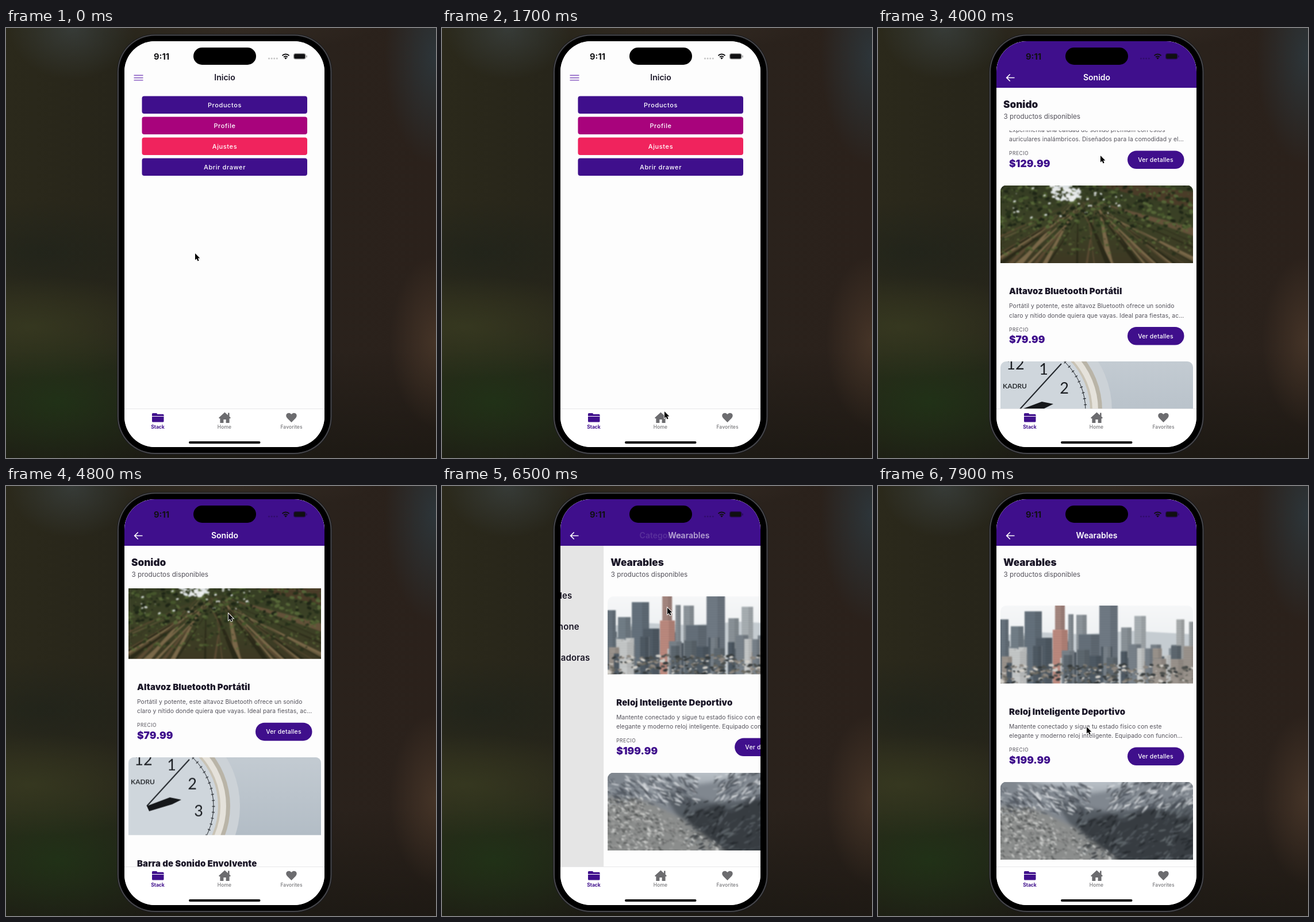
Recreate the animation shown at these times as an HTML page with a canvas. Size 748x748 px, loop 8000 ms.

```html
<!DOCTYPE html>
<html lang="es">
<head>
<meta charset="utf-8">
<title>Tienda</title>
<style>
html, body { margin: 0; width: 100%; height: 100%; overflow: hidden; }
body {
  background:
    radial-gradient(110px 90px at 115px 0, #434d5188, transparent),
    radial-gradient(90px 190px at 748px 50px, #2d3a41cc, transparent),
    radial-gradient(80px 150px at 748px 545px, #56402f99, transparent),
    radial-gradient(240px 40px at 400px 0, #3a2f2799, transparent),
    radial-gradient(260px 90px at 40px 520px, #3b3f22aa, transparent),
    radial-gradient(230px 130px at 90px 650px, #203517cc, transparent),
    radial-gradient(240px 90px at 60px 390px, #1d221a99, transparent),
    linear-gradient(transparent 75%, #15140f99),
    linear-gradient(90deg, #2b291b, #27251a 25%, #2a221c 75%, #2b211b);
}
canvas { display: block; width: 100vw; height: 100vh; }
</style>
</head>
<body>
<canvas id="stage" width="748" height="748"></canvas>
<script>
const g = document.getElementById('stage').getContext('2d');
const PURPLE = '#3f0f8c', PAPER = '#fdfdfd', INK = '#1b1728', GREY = '#55535c';
const LEFT = 206, WIDTH = 348, LOOP = 8000;
const clamp = v => Math.max(0, Math.min(1, v));
const ease = u => 1 - (1 - clamp(u)) ** 3;

let seed = 7;
const rnd = (a = 1, b = 0) => b + (a - b) * (seed = seed * 16807 % 2147483647) / 2147483647;

function box(x, y, w, h, r, color) {
  g.fillStyle = color;
  g.beginPath();
  g.roundRect(x, y, w, h, r);
  g.fill();
}

// y is the middle of the capitals
function text(s, x, y, size, weight, color, align = 'left', spacing = 0) {
  g.font = `${weight} ${size}px Inter, "Open Sans", sans-serif`;
  g.letterSpacing = spacing + 'px';
  g.textAlign = align;
  g.fillStyle = color;
  g.fillText(s, x, y + size * .36);
}

function layer(draw, alpha = 1) {
  g.save();
  g.globalAlpha *= alpha;
  draw();
  g.restore();
}

function clipBox(...r) {
  g.beginPath();
  g.roundRect(...r);
  g.clip();
}

// ---- pictures, painted once and softened ----
function picture(paint, soft = .8) {
  const [raw, out] = [0, 1].map(() => Object.assign(document.createElement('canvas'), { width: 335, height: 136 }));
  paint(raw.getContext('2d'));
  const c = out.getContext('2d');
  c.drawImage(raw, 0, 0);
  c.filter = `blur(${soft}px)`;
  c.drawImage(raw, 0, 0);
  return out;
}

function shape(c, color, ...p) {
  c.fillStyle = color;
  c.beginPath();
  for (let i = 0; i < p.length; i += 2) c.lineTo(p[i], p[i + 1]);
  c.closePath();
  c.fill();
}

function blob(c, x, y, w, h, color, turn = 0) {
  c.fillStyle = color;
  c.beginPath();
  c.ellipse(x, y, w, h, turn, 0, 7);
  c.fill();
}

function blobs(c, n, x, y, w, h, colors, size, turn = 0, flat = .6) {
  for (let i = 0; i < n; i++) {
    const r = rnd(size, size * .25);
    blob(c, x + rnd(w), y + rnd(h), r, r * flat, colors[i % colors.length], turn + rnd(.5, -.5));
  }
}

function fade(c, ...colors) {
  const f = c.createLinearGradient(0, 0, 0, 136);
  colors.forEach((color, i) => f.addColorStop(i / (colors.length - 1), color));
  c.fillStyle = f;
  c.fillRect(0, 0, 335, 136);
}

const field = picture(c => {
  fade(c, '#94764a', '#8a6d42', '#66502f');
  shape(c, '#ddd9d2', 68, 0, 335, 0, 335, 15, 95, 22);
  shape(c, '#21231a', 88, 18, 130, 12, 165, 4, 215, 0, 335, 0, 335, 38, 200, 32, 112, 27);
  for (let x = 95; x < 215; x += 6) shape(c, '#21231a', x, 26, x + 4, 16 - (x - 95) * .13 - rnd(5), x + 8, 26);
  shape(c, '#6d5639', 0, 0, 62, 0, 112, 26, 150, 44, 95, 60, 0, 62);
  blobs(c, 24, 48, 0, 22, 8, ['#23241b'], 5);
  shape(c, '#4d3c2999', 0, 60, 95, 62, 140, 136, 0, 136);
  shape(c, '#33271f', 114, 42, 119, 42, 116, 54, 103, 62, 122, 88, 137, 136, 102, 136, 103, 104, 91, 66, 108, 56);
  blobs(c, 500, 0, 46, 335, 90, ['#a3855244', '#3a2d1c44', '#8a6c3c55'], 5, 1.4, .2);
});

const forest = picture(c => {
  fade(c, '#343c23', '#3c4226', '#3d3823');
  for (let i = 0; i < 44; i++) {
    const x = rnd(560, -140), px = 125 + rnd(45), w = rnd(6, 1);
    shape(c, ['#5a4a32', '#7a6849', '#2a2918'][i % 3], x, 140, x + w * 2, 140, px + 1, 24);
  }
  shape(c, '#4a3c28', 165, 0, 335, 42, 335, 12, 250, 0);
  shape(c, '#64523a', 165, 28, 335, 88, 335, 74);
  blobs(c, 420, 0, 0, 335, 75, ['#26301a', '#46562c', '#566638', '#1e2516'], 5);
  blobs(c, 240, 0, 60, 335, 60, ['#26301acc', '#46562ccc', '#5b6a3acc'], 4);
  blobs(c, 70, 90, 0, 50, 26, ['#eceeee', '#dfe4e6'], 5);
  blobs(c, 60, 130, 8, 85, 42, ['#e4e8e8', '#46562c', '#2a341c'], 3);
  blobs(c, 45, 20, 5, 90, 70, ['#d5dbd8', '#46562c', '#26301a'], 3);
});

const clock = picture(c => {
  fade(c, '#c3cbd2', '#b3bdc6');
  const disc = (r, color) => blob(c, 32, 85, r, r, color);
  disc(162, '#ccd2d7');
  disc(145, '#b9b4a7');
  disc(138, '#e5e2db');
  disc(128, '#c9c3b5');
  disc(124, '#cfd6dc');
  c.strokeStyle = '#22262b';
  c.lineWidth = 5;
  c.setLineDash([1.2, 9.2]);
  c.beginPath();
  c.arc(32, 85, 116, 0, 7);
  c.stroke();
  c.setLineDash([]);
  c.lineWidth = 1;
  c.stroke();
  c.fillStyle = '#1b1e22';
  c.textAlign = 'center';
  c.font = '27px Lato, sans-serif';
  c.fillText('12', 26, 14);
  c.fillText('1', 75, 23);
  c.fillText('2', 111, 56);
  c.fillText('3', 122, 103);
  c.font = '600 12px Lato, sans-serif';
  c.fillText('KADRU', 25, 47);
  c.lineWidth = 2;
  c.beginPath();
  c.moveTo(106, 4);
  c.lineTo(32, 85);
  c.stroke();
  shape(c, '#15171a', 32, 85, 72, 70, 92, 74, 76, 82, 36, 94);
}, .4);

const city = picture(c => {
  fade(c, '#f6f7f8', '#eceff1', '#a9adad');
  shape(c, '#c5ccd1', 0, 52, 60, 46, 140, 50, 230, 44, 335, 50, 335, 136, 0, 136);
  const tower = (x, y, w, color) => {
    c.fillStyle = color;
    c.fillRect(x, y, w, 136 - y);
    c.fillStyle = '#00000014';
    for (let k = y + 3; k < 125; k += 4) c.fillRect(x, k, w, 1.4);
    c.fillRect(x + w * .6, y, w * .4, 136);
  };
  for (let i = 0; i < 30; i++) tower(rnd(325), rnd(85, 52), rnd(20, 9), ['#8a949b', '#aeb5b9', '#6b757e'][i % 3]);
  [[0, 24, 14, '#67737d'], [18, 36, 22, '#737f88'], [42, 10, 30, '#65727d'], [95, 0, 17, '#a58780'],
   [118, 15, 9, '#858d94'], [132, 16, 18, '#8e969c'], [172, 0, 32, '#717b85'], [233, 18, 20, '#a9b0b4'],
   [210, 38, 18, '#8b9399'], [306, 24, 14, '#a9adae'], [328, 28, 7, '#9aa0a3'],
   [62, 56, 28, '#525d67'], [91, 42, 26, '#bd8a7f'], [136, 50, 36, '#66717b']].forEach(b => tower(...b));
  for (let i = 0; i < 40; i++) tower(rnd(330, -8), rnd(100, 66), rnd(24, 10), ['#4f5a64', '#c6c9c9', '#79828a', '#5e6870', '#9b948d'][i % 5]);
  blobs(c, 330, 0, 102, 335, 36, ['#d3d0ca', '#4c4f4d', '#8d8780', '#34393a', '#6c6a62'], 5, 0, .5);
});

const mountains = picture(c => {
  fade(c, '#b9c0c7', '#7d848b', '#62676b');
  c.filter = 'blur(3px)';
  shape(c, '#80878f', -9, -9, 70, 4, 120, 12, 150, 22, 190, 16, 230, 6, 270, -9, 345, -9, 345, 145, -9, 145);
  shape(c, '#565d64', 95, 30, 180, 52, 225, 50, 345, 25, 345, 145, 160, 145);
  shape(c, '#373c41', 130, 74, 190, 56, 215, 68, 255, 46, 345, 62, 345, 145, 190, 145);
  shape(c, '#8b8d8c', -9, 40, 70, 50, 130, 80, 215, 145, -9, 145);
  c.filter = 'none';
  const light = ['#dfe3e6aa', '#4b525b99', '#a9afb499', '#3d434999'];
  blobs(c, 260, -5, 6, 160, 50, light, 9, .6, .22);
  blobs(c, 230, 185, 0, 155, 48, light, 9, -.6, .22);
  blobs(c, 260, 135, 50, 200, 86, ['#23272bbb', '#5c636999', '#40464bbb', '#7d848a77'], 9, -.6, .25);
  for (let k = 0; k < 5; k++)
    blobs(c, 170, -8, 44 + k * 18, 70 + k * 34, 24, ['#d6d7d5cc', '#4a4d4dbb', '#a3a4a199', '#6b6d6d99'], 4, .4, .4);
});

const clouds = picture(c => {
  fade(c, '#606060', '#7c7c7c', '#383838');
  c.filter = 'blur(4px)';
  blob(c, 60, 29, 110, 8, '#b9b9b9');
  blob(c, 60, 66, 120, 20, '#505050');
  blob(c, 185, 24, 48, 17, '#343434');
  blob(c, 285, 18, 55, 9, '#444');
  blob(c, 290, 58, 52, 17, '#eee');
  blob(c, 215, 68, 42, 8, '#c9c9c9');
  blob(c, 180, 95, 150, 12, '#2b2b2b');
  c.filter = 'blur(2px)';
  blobs(c, 22, 205, 10, 30, 26, ['#f4f4f4', '#d0d0d0'], 7);
  blobs(c, 40, 130, 8, 90, 30, ['#2c2c2c', '#484848'], 10);
  blobs(c, 40, 245, 42, 90, 30, ['#fff', '#d4d4d4', '#a2a2a2'], 9);
  blobs(c, 20, 235, 10, 100, 18, ['#3f3f3f', '#8c8c8c'], 9, 0, .4);
});

// ---- screens ----
function home() {
  ['Productos', 'Profile', 'Ajustes', 'Abrir drawer'].forEach((label, i) => {
    const y = 118.5 + i * 36;
    box(236.5, y, 287.5, 30.5, 4, [PURPLE, '#a8037c', '#f0235d'][i % 3]);
    text(label, 380.5, y + 15.2, 11, 500, '#fff', 'center', .6);
  });
}

function categories() {
  ['Sonido', 'Wearables', 'Smartphone', 'Computadoras'].forEach((label, i) =>
    text(label, 230, 136.5 + i * 54, 15, 600, INK, 'left', .15));
}

const shop = (title, items, scrollKeys) => t => {
  text(title, 218, 132.5, 17.2, 900, INK);
  text('3 productos disponibles', 218.5, 153.5, 11.75, 400, GREY);
  const scroll = track(scrollKeys, t)[0];
  layer(() => {
    clipBox(LEFT, 178, WIDTH, 485, 0);
    items.forEach(([photo, name, line1, line2, price], i) => {
      const y = 192 + i * 306.5 - scroll;
      layer(() => {
        clipBox(213, y, 335, 135.5, [10, 10, 0, 0]);
        g.drawImage(photo, 213, y);
      });
      text(name, 228, y + 184.5, 15, 900, INK, 'left', .1);
      text(line1, 228, y + 210, 10.3, 400, GREY, 'left', .1);
      text(line2, 228, y + 226.3, 10.3, 400, GREY, 'left', .1);
      text('PRECIO', 228, y + 251, 8.5, 400, GREY, 'left', .5);
      text(price, 228, y + 268.5, 17.4, 900, PURPLE);
      box(434, y + 246.5, 98.5, 31.5, 16, PURPLE);
      text('Ver detalles', 483, y + 262.3, 10.5, 500, '#fff', 'center', .2);
    });
  });
};

const sound = shop('Sonido', [
  [field, 'Auriculares Inalámbricos Premium', 'Experimenta una calidad de sonido premium con estos',
    'auriculares inalámbricos. Diseñados para la comodidad y el...', '$129.99'],
  [forest, 'Altavoz Bluetooth Portátil', 'Portátil y potente, este altavoz Bluetooth ofrece un sonido',
    'claro y nítido donde quiera que vayas. Ideal para fiestas, ac...', '$79.99'],
  [clock, 'Barra de Sonido Envolvente', 'Disfruta de un sonido envolvente en casa con esta barra',
    'de diseño compacto. Compatible con tu televisor y con tu...', '$149.99']
], [[3800, 0], [3900, 110], [4000, 225], [4300, 440], [4700, 440], [5000, 120], [5200, 0]]);

const wearables = shop('Wearables', [
  [city, 'Reloj Inteligente Deportivo', 'Mantente conectado y sigue tu estado físico con este',
    'elegante y moderno reloj inteligente. Equipado con funcion...', '$199.99'],
  [mountains, 'Pulsera de Actividad Fitness', 'Pulsera inteligente que monitorea pasos, calorías, sueño y',
    'actividad física. Resistente al agua y con batería de larga d...', '$49.99'],
  [clouds, 'Gafas Inteligentes', 'Gafas ligeras con audio integrado y control por voz para',
    'acompañarte todo el día. Con lentes de gran calidad y un...', '$299.99']
], [[6850, 0], [6900, 70], [7000, 157], [7100, 228], [7250, 300], [7450, 300], [7700, 60], [7900, -16]]);

const HOME = { title: 'Inicio', body: home, ink: INK };
const CATS = { title: 'Categorías', body: categories, ink: '#fff' };
const SOUND = { title: 'Sonido', body: sound, ink: '#fff' };
const WEAR = { title: 'Wearables', body: wearables, ink: '#fff' };

// start, lower screen, upper screen, upper one enters
const NAV = [[2670, HOME, CATS, true], [3250, CATS, SOUND, true], [5650, CATS, SOUND, false], [6300, CATS, WEAR, true]];

const POINTER = [[0, 329, 392], [500, 230, 84], [700, 230, 84], [1050, 530, 305], [1300, 530, 305],
  [1700, 387, 667], [1800, 387, 667], [2400, 416, 130], [3350, 416, 130], [3800, 387, 222], [5000, 387, 222],
  [5500, 229, 90], [5750, 229, 90], [6200, 392, 186], [6400, 392, 186], [7100, 392, 366], [7900, 363, 419]];

function track(keys, t) {
  const i = keys.findIndex(k => k[0] > t);
  if (i < 1) return (i ? keys[keys.length - 1] : keys[0]).slice(1);
  const a = keys[i - 1], b = keys[i], u = (t - a[0]) / (b[0] - a[0]);
  return a.slice(1).map((v, k) => v + (b[k + 1] - v) * u);
}

// ---- phone parts ----
const HOUSE = new Path2D('M380.5 668.5L391 678L389.6 679.6L388.6 679V687H382.6V681H378.4V687H372.4V679L371.4 679.6L370 678ZM386 669.5H388.6V676H386Z');
const HEART = new Path2D('M496.5 686L489 678.5C484 672.5 491 666.5 496.5 672C502 666.5 509 672.5 504 678.5Z');
const ARROW = new Path2D('M237.5 86.5H224M229.7 80.5L223.7 86.5L229.7 92.5');
const HAND = new Path2D('M0 0V11.6L2.7 9.2L4.6 13.4L6.6 12.5L4.8 8.4H8.4Z');

function fillPath(path, color) {
  g.fillStyle = color;
  g.fill(path);
}

function header(low, high, p, t) {
  const a = low === HOME ? p : 1;
  box(LEFT, 23, WIDTH, 81, 0, PAPER);
  layer(() => box(LEFT, 23, WIDTH, 81, 0, PURPLE), a);
  layer(() => text(low.title, 380.5, 86.3, 14, 600, low.ink, 'center'), (1 - p) ** 1.3);
  layer(() => text(high.title, 380.5 + (1 - p) * 227, 86.3, 14, 600, high.ink, 'center'), p ** 2);
  layer(() => { for (const y of [81.6, 85.8, 90]) box(222.5, y, 16, 1.6, 0, '#8d62c4'); }, 1 - a);
  layer(() => {
    g.strokeStyle = '#fff';
    g.lineWidth = 1.7;
    g.stroke(ARROW);
  }, a * (t >= 5500 && t < 5750 ? .6 : 1));
}

function tabs() {
  box(LEFT, 662, WIDTH, 68, 0, '#fff');
  box(LEFT, 662, WIDTH, 1, 0, '#e8e8ea');
  box(254, 670, 9, 6, 1.5, PURPLE);
  box(254, 671.8, 20.5, 13.8, 1.5, PURPLE);
  box(254, 675, 20.5, 1, 0, '#fff');
  fillPath(HOUSE, '#6c6c6f');
  fillPath(HEART, '#6c6c6f');
  text('Stack', 264, 694, 8.5, 700, PURPLE, 'center');
  text('Home', 380, 694, 8.5, 500, '#77777a', 'center', .1);
  text('Favorites', 496.5, 694, 8.5, 500, '#77777a', 'center', .1);
}

function drawer() {
  box(LEFT, 23, 268, 706, 0, '#fff');
  box(218, 82, 247, 36, 8, '#ece6f5');
  text('Productos', 232, 100, 13, 600, PURPLE);
  text('Profile', 232, 140, 13, 600, GREY);
}

function status() {
  text('9:11', 270.5, 49.5, 14.7, 700, '#101012', 'center');
  box(326, 34, 109, 30, 15, '#000');
  for (let i = 0; i < 4; i++) box(456 + i * 4.6, 51.5, 3, 3, 1.5, '#0000003a');
  g.strokeStyle = '#101012';
  g.lineWidth = 2;
  for (const r of [4.8, 8.4]) {
    g.beginPath();
    g.arc(486.5, 54, r, -2.36, -.78);
    g.stroke();
  }
  g.fillStyle = '#101012';
  g.beginPath();
  g.moveTo(486.5, 54.5);
  g.arc(486.5, 54.5, 3, -2.36, -.78);
  g.fill();
  box(500, 44, 21.5, 10.5, 3.5, '#00000066');
  box(501.3, 45.3, 18.9, 7.9, 2.2, '#101012');
  box(522.3, 47.5, 1.4, 4, 1, '#00000066');
  box(318, 719, 124.5, 4, 2, '#000');
}

function draw(t) {
  g.clearRect(0, 0, 748, 748);
  box(193, 10.5, 374.5, 731.5, 66, '#1b1b1d');
  box(194, 11.5, 372.5, 729.5, 65, '#47474b');
  box(196, 13.5, 368.5, 725.5, 63, '#000');

  const [start, low, high, enters] = NAV.findLast(n => t >= n[0]) || NAV[0];
  const u = ease((t - start) / 500), p = enters ? u : 1 - u;
  const open = ease((t - 600) / 400) - ease((t - 1300) / 400);

  layer(() => {
    clipBox(LEFT, 23, WIDTH, 706, 53);
    layer(() => {
      g.translate(268 * open, 0);
      box(LEFT, 23, WIDTH, 706, 0, PAPER);
      if (p < 1) layer(() => {
        g.translate(-.3 * WIDTH * p, 0);
        low.body(t);
      });
      if (p > 0) {
        layer(() => box(LEFT, 104, WIDTH, 558, 0, '#000'), .12 * p);
        layer(() => {
          g.translate(WIDTH * (1 - p), 0);
          box(LEFT, 104, WIDTH, 558, 0, PAPER);
          high.body(t);
        });
      }
      header(low, high, p, t);
      tabs();
      layer(() => box(LEFT, 23, WIDTH, 706, 0, '#000'), .5 * open);
    });
    if (open > 0) layer(() => {
      g.translate(268 * (open - 1), 0);
      drawer();
    });
    status();
  });

  layer(() => {
    g.translate(...track(POINTER, t));
    g.strokeStyle = '#fff';
    g.lineWidth = 1.8;
    g.stroke(HAND);
    fillPath(HAND, '#000');
  });
}

const begin = performance.now();
function tick() {
  const t = (performance.now() - begin) % LOOP;
  draw(Math.floor(t / 100) * 100);
  requestAnimationFrame(tick);
}
tick();
</script>
</body>
</html>
```
